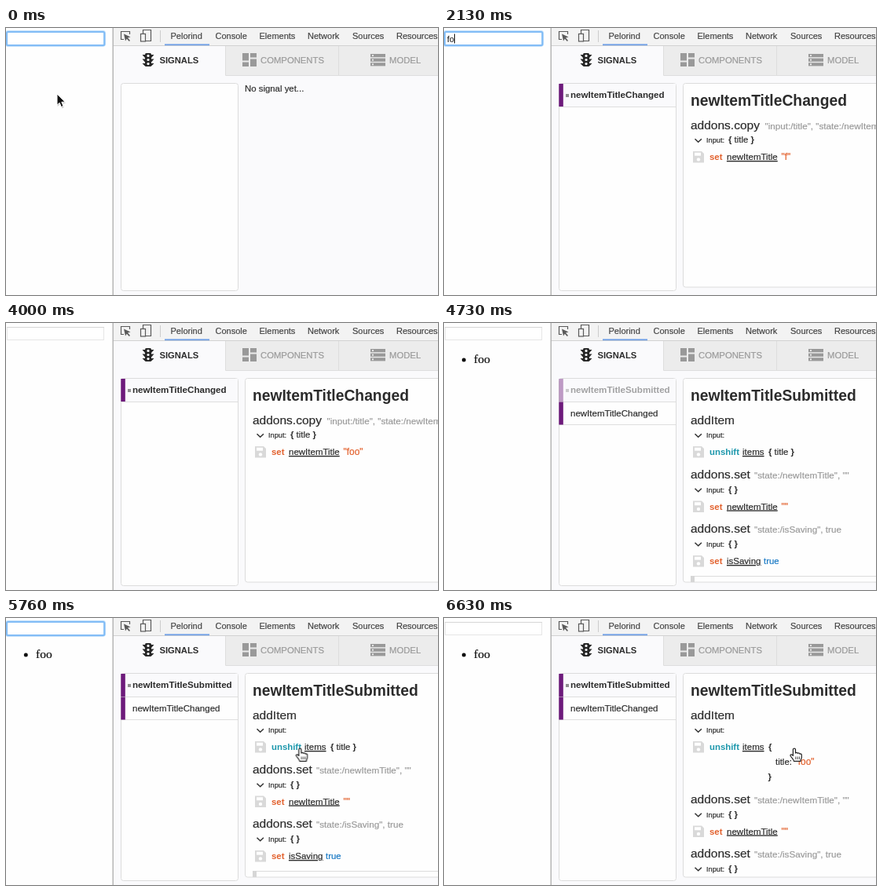
These frames come from a looping animation (550x340 px, 8000 ms). An HTML page:

```html
<!DOCTYPE html>
<html lang="en">
<head>
<meta charset="utf-8">
<title>Signal debugger</title>
<style>
html, body { margin: 0; width: 100%; height: 100%; overflow: hidden; background: #fefefe; }
svg { display: block; width: 550px; height: 340px; }
text {
  font-family: "Liberation Sans", Arial, sans-serif; white-space: pre;
  color: #2c2c2c; fill: currentColor; stroke: currentColor; stroke-width: .2;
}
.b { font-weight: 700; stroke-width: 0; }
.tab { color: #444; }
.dim { color: #999; }
.str { color: #e2602c; }
.add { color: #1c97ac; }
.bool { color: #1778c4; }
.u { text-decoration: underline; }
.serif { font-family: "Liberation Serif", Times, serif; color: #111; }
</style>
</head>
<body>
<svg id="stage" viewBox="0 0 550 340" xmlns="http://www.w3.org/2000/svg"></svg>
<script>
const LOOP = 8000;

const text = (x, y, size, str, cls = '') =>
  `<text x="${x}" y="${y}" font-size="${size}" class="${cls}">${str}</text>`;
const rect = (x, y, w, h, fill, more = '') =>
  `<rect x="${x}" y="${y}" width="${w}" height="${h}" fill="${fill}" ${more}/>`;
const path = (d, more) => `<path d="${d}" ${more}/>`;
const group = (id, ...parts) => `<g id="${id}">${parts.join('')}</g>`;
const line = (color, w = 1) => `fill="none" stroke="${color}" stroke-width="${w}"`;

// Left page
const page = () => [
  rect(0, 0, 136, 340, '#fefefe'),
  rect(1.5, 5.5, 123, 16, '#fff', 'stroke="#e6e6e6"'),
  path('M1 5.5H125', line('#d6d6d6')),
  group('ring',
    rect(.9, 4.9, 124.4, 17.2, '#fff', 'rx="2" stroke="#c3e0fb" stroke-width="3.6"'),
    rect(1, 5, 124.2, 17, '#fff', 'rx="1.5" stroke="#83bdf6" stroke-width="2.2"')),
  group('typed1', text(4, 18, 10.5, 'f')),
  group('typed2', text(4, 18, 10.5, 'fo')),
  group('typed3', text(4, 18, 10.5, 'foo')),
  group('caretAt', group('caret', rect(0, 7.5, 1, 12, '#111'))),
  group('todo', '<circle cx="25.3" cy="47" r="2.5" fill="#111"/>', text(38, 51, 15.5, 'foo', 'serif'))
];

// Top bars of the tool panel
const bars = () => [
  rect(136, 0, 414, 340, '#fafafc'),
  rect(136, 0, 414, 22.5, '#f3f3f3'),
  path('M136 22.5H550', line('#d2d2d2')),
  path('M150 14.5H146.5V4.5H157.5V8', line('#5a5a5a', 1.2)),
  path('M150 7.5L158.5 11.5L155 12.6L158 16L156.8 17L153.8 13.8L152 16.5Z', 'fill="#5a5a5a"'),
  path('M174.5 7V2.5H184.5V16.5H178', line('#5a5a5a', 1.2)),
  rect(171.5, 7.5, 6, 9.5, '#f3f3f3', 'stroke="#5a5a5a" stroke-width="1.2"'),
  path('M196.5 3V18', line('#ccc')),
  rect(202, 20.4, 57, 1.8, '#6f9fe6'),
  ...[[209.5, 'Pelorind'], [266.5, 'Console'], [322.5, 'Elements'], [384, 'Network'],
    [441, 'Sources'], [497, 'Resources']].map(([x, s]) => text(x, 14, 11, s, 'tab')),

  rect(279, 23, 271, 37, '#ececec'),
  path('M279.5 23V60.5H550M423.5 23V60', line('#dedede')),
  rect(177, 32, 8, 17, '#262626', 'rx="1.5"'),
  path('M173.5 34H188.5L185 38H177ZM173.5 39.5H188.5L185 43.5H177ZM173.5 45H188.5L185 48.5H177Z', 'fill="#262626"'),
  ...[35.4, 40.5, 45.6].map(y => `<circle cx="181" cy="${y}" r="1.6" fill="#fafafc"/>`),
  text(195.5, 45, 11.2, 'SIGNALS', 'b'),
  rect(301, 32, 8, 9.5, '#999'), rect(301, 43.5, 8, 5.5, '#999'),
  rect(311, 32, 8, 5.5, '#999'), rect(311, 39.5, 8, 9.5, '#999'),
  text(324, 45, 11.3, 'COMPONENTS', 'dim'),
  ...[33, 38.6, 44.2].map(y => rect(464, y, 19, 4.2, '#999') + rect(466, y + 1.2, 2, 1.8, '#ececec')),
  text(488, 45, 11.3, 'MODEL', 'dim')
];

// Rows in the list of signals
const row = y => rect(147, y, 148, 29, '#fafafc') + path(`M147 ${y + 29.5}H295`, line('#dedede'));
const bar = y => rect(146.3, y, 5.5, 29, '#6d1a7b');
const current = name =>
  bar(71) + rect(155, 84, 4, 4, '#909090') + text(161, 89, 11.6, name, 'b');

const list = () => [
  rect(146.5, 70.5, 149, 264, '#fefefe', 'rx="3" stroke="#dcdcdc"'),
  group('listA', row(71), current('newItemTitleChanged')),
  group('listB', row(71), group('pulse', current('newItemTitleSubmitted')),
    path('M147 129.5H295', line('#dedede')), bar(100.5),
    text(161, 118.5, 11.5, 'newItemTitleChanged'))
];

const title = name => text(314, 99.3, 19.3, name, 'b');
const head = (y, name, args = '', x = 395) =>
  text(314, y - .8, 15.5, name) + text(x, y - .8, 11.7, args, 'dim');
const input = (y, value = '') => [
  path(`M319.5 ${y - 4.8}L323.7 ${y - .8}L327.9 ${y - 4.8}`, line('#333', 1.5)),
  text(334, y, 9.2, 'Input:'), value
].join('');
const object = (x, y, key) => text(x, y, 11.4,
  `<tspan class="b">{</tspan> ${key ? key + ' ' : ''}<tspan class="b">}</tspan>`);
const change = (y, verb, cls, x, key) => [
  path(`M317 ${y - 11}H328L331 ${y - 8}V${y + 3.5}H317Z`, 'fill="#d9d9d9"'),
  rect(319, y - 9.3, 8, 4, '#fefefe'),
  `<circle cx="324" cy="${y - .6}" r="2.2" fill="#fefefe"/>`,
  text(338, y, 11.4, verb, 'b ' + cls), text(x, y, 11.5, key, 'u')
].join('');

const detail = () => [
  group('empty', text(304, 81, 11.4, 'No signal yet...')),
  group('frame', rect(304.5, 70.5, 260, 259.5, '#fefefe', 'rx="3" stroke="#dcdcdc"')),
  '<clipPath id="inside"><rect x="305" y="71" width="245" height="258.5"/></clipPath><g clip-path="url(#inside)">',
  group('detailA',
    title('newItemTitleChanged'),
    head(130, 'addons.copy', '"input:/title", "state:/newItemTitle"', 408.5),
    input(146, object(362, 146, 'title')),
    change(168, 'set', 'str', 360, 'newItemTitle'),
    ...['f', 'fo', 'foo'].map((s, i) => group('value' + (i + 1), text(429.5, 168, 11.9, `"${s}"`, 'str')))),
  group('detailB',
    title('newItemTitleSubmitted'),
    head(130, 'addItem'), input(146),
    change(168, 'unshift', 'add', 380, 'items'),
    group('closed', object(413, 168, 'title')),
    group('open', text(413, 168, 11.4, '{', 'b'), text(422, 187, 11.4, 'title:'),
      text(446.5, 187, 11.9, '"foo"', 'str'), text(412.5, 206, 11.4, '}', 'b')),
    group('tail',
      head(199, 'addons.set', '"state:/newItemTitle", ""'),
      input(215.5, object(362, 215.5)),
      change(237.5, 'set', 'str', 360, 'newItemTitle'), text(429.5, 237.5, 11.9, '""', 'str'),
      head(268, 'addons.set', '"state:/isSaving", true'),
      input(284.5, object(362, 284.5)),
      change(307, 'set', 'str', 360, 'isSaving'), text(407, 307, 11.4, 'true', 'bool'),
      path('M314 322.5H550', line('#dcdcdc')), rect(314, 322, 5, 20, '#d6d6d6'))),
  '</g>'
];

const pointer = () => group('pointer',
  group('arrow',
    path('M.6 1.6V16L3.9 13L6.2 18.2L8.8 17L6.5 12H11Z', 'fill="#000" opacity=".2"'),
    path('M0 0V14.2L3.2 11.3L5.4 16.5L8 15.4L5.8 10.3H10.2Z', 'fill="#111" stroke="#fff" stroke-width="1"')),
  group('hand',
    path('M-1.6 1.6C-1.6 -.5 1.5 -.5 1.5 1.6V6C2.4 5 4 5.2 4.3 6.4C5.3 5.6 6.6 6 6.9 7.1' +
      'C8 6.6 9.3 7.2 9.3 8.6V11.6C9.3 13 8 14 8 16.3H-.6C-.8 14.4 -3 12.4 -4.6 10' +
      'C-5.7 8.2 -3.9 7.2 -2.7 8.3L-1.6 9.4Z',
      'fill="#fff" stroke="#222" stroke-width="1.2" stroke-linejoin="round"'),
    path('M1.8 10.5V14M4.1 10.5V14M6.4 10.5V14', line('#333', .9))));

const stage = document.getElementById('stage');
stage.innerHTML = [...page(), ...bars(), path('M136.2 0V340', line('#b2b2b2', 1.4)),
  ...list(), ...detail(), pointer()].join('');

// Rows are [ms, value, easing to the next row]; without easing the value holds.
function play(id, prop, rows) {
  const frames = rows.map(([ms, value, easing = 'step-end']) => ({ offset: ms / LOOP, [prop]: value, easing }));
  frames.push({ offset: 1, [prop]: rows[rows.length - 1][1] });
  document.getElementById(id).animate(frames, { duration: LOOP, iterations: Infinity });
}

// Shows an element only within the given spans of time.
function show(id, ...spans) {
  const rows = spans[0][0] > 0 ? [[0, 0]] : [];
  for (const [from, to = LOOP] of spans) {
    rows.push([from, 1]);
    if (to < LOOP) rows.push([to, 0]);
  }
  play(id, 'opacity', rows);
}

const at = (x, y = 0) => `translate(${x}px, ${y}px)`;

show('ring', [0, 4000], [5060, 6530]);
show('typed1', [800, 2130]);
show('typed2', [2130, 3060]);
show('typed3', [3060, 4000]);
show('caret', [100, 600], [800, 1300], [1800, 2630], [3060, 3560], [5060, 5600], [6060, 6530]);
play('caretAt', 'transform', [[0, at(3)], [800, at(7.5)], [2130, at(13)], [3060, at(19)], [4000, at(3)]]);
show('todo', [4030]);

show('empty', [0, 830]);
show('frame', [830]);
show('listA', [830, 4060]);
show('detailA', [830, 4060]);
show('value1', [830, 2160]);
show('value2', [2160, 3100]);
show('value3', [3100, 4060]);
show('listB', [4060]);
show('detailB', [4060]);
play('pulse', 'opacity', [[0, 1], [4060, 1, 'ease-in-out'], [4700, .42, 'ease-in-out'], [5080, 1]]);

show('closed', [0, 6600]);
show('open', [6600]);
play('tail', 'transform', [[0, at(0)], [6600, at(0, 38)]]);

show('arrow', [0, 770], [5060, 5700]);
show('hand', [5700]);
play('pointer', 'transform', [
  [0, at(65, 84)],
  [5360, at(65, 84), 'ease-in'],
  [5560, at(215, 146), 'linear'],
  [5760, at(374, 166), 'linear'],
  [5890, at(424, 174), 'ease-out'],
  [6060, at(446, 166)]
]);
</script>
</body>
</html>
```
